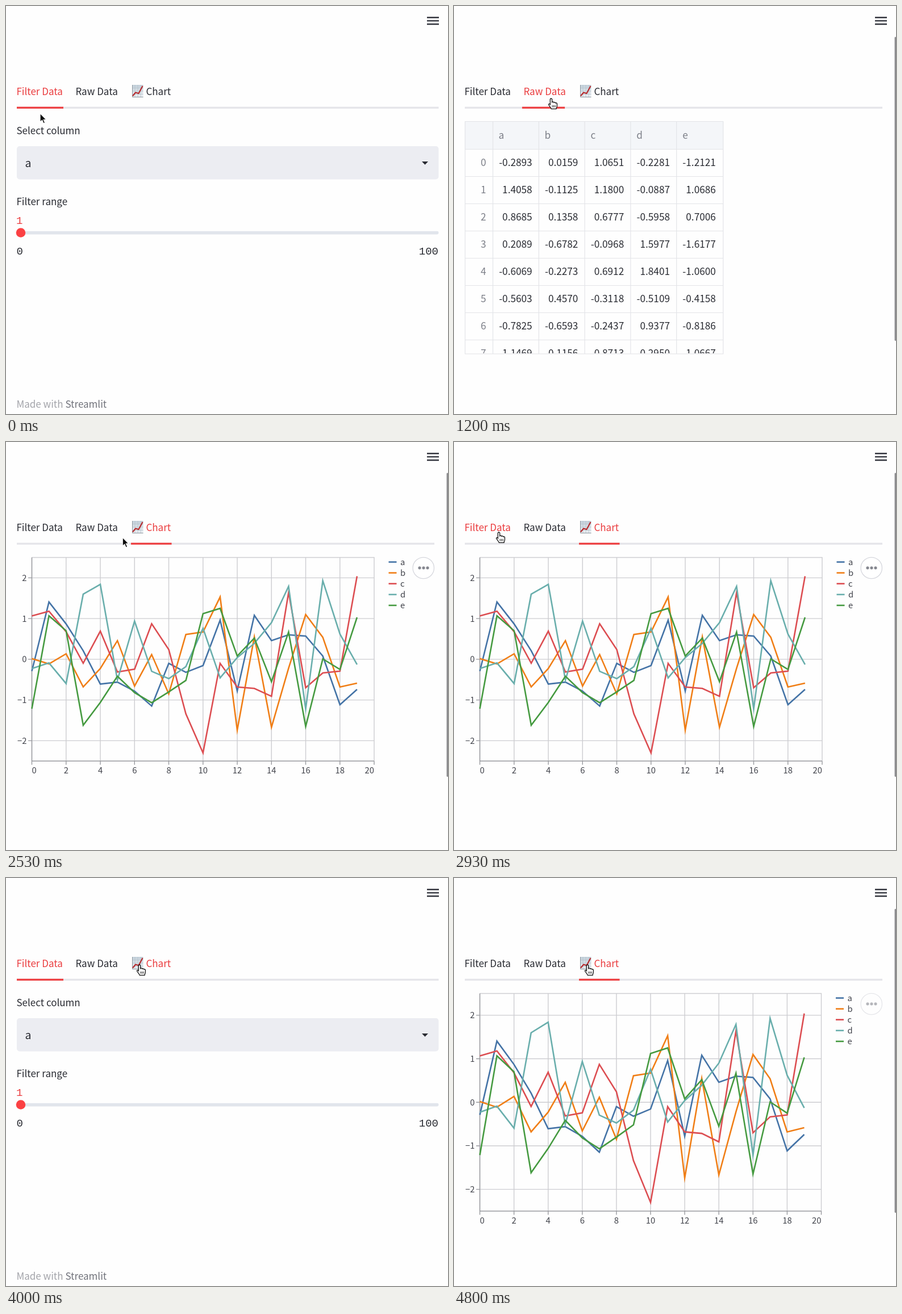
Recreate the animation shown at these times as an HTML page. Size 778 px wide and 719 px high, loop 4.87 s.

```html
<!DOCTYPE html>
<html lang="en">
<head>
<meta charset="utf-8">
<title>Tabs demo</title>
<style>
  html, body { margin: 0; width: 100%; height: 100%; overflow: hidden; background: #fefefe; }
  svg { display: block; width: 100vw; height: 100vh; }
  text { font-family: "Noto Sans CJK JP", "Noto Sans CJK SC", "Noto Sans CJK", "Noto Sans", sans-serif; font-size: 17px; fill: #282a31; white-space: pre; }
  .mono { font-family: "Liberation Mono", "DejaVu Sans Mono", monospace; font-size: 19px; }
  .cell { font-size: 17.2px; }
  .dim { fill: #7b7e87; }
  .axis { font-size: 14.8px; fill: #41434b; }
</style>
</head>
<body>
<svg id="stage" viewBox="0 0 778 719" xmlns="http://www.w3.org/2000/svg"></svg>
<script>
const LOOP = 4870;
const INK = '#282a31', RED = '#ea3c3e';
const stage = document.getElementById('stage');

function add(parent, tag, attrs = {}, content) {
  const node = document.createElementNS('http://www.w3.org/2000/svg', tag);
  for (const key in attrs) node.setAttribute(key, attrs[key]);
  if (content !== undefined) node.textContent = content;
  parent.appendChild(node);
  return node;
}
const group = (parent = stage, attrs) => add(parent, 'g', attrs);
const rect = (parent, x, y, width, height, fill, rx = 0) =>
  add(parent, 'rect', { x, y, width, height, fill, rx });
const path = (parent, d, stroke, width, fill = 'none') =>
  add(parent, 'path', { d, stroke, fill, 'stroke-width': width });
const label = (parent, x, y, str, cls = '', anchor = 'start') =>
  add(parent, 'text', { x, y, class: cls, 'text-anchor': anchor }, str);

const names = ['a', 'b', 'c', 'd', 'e'];
const colors = ['#4473a6', '#f07e16', '#dc4d51', '#69aeac', '#459a40'];
const data = [
  [-.2893, 1.4058, .8685, .2089, -.6069, -.5603, -.7825, -1.1469, -.1, -.32, -.155, .96, -.78, 1.08, .46, .6, .57, .08, -1.115, -.74],
  [.0159, -.1125, .1358, -.6782, -.2273, .457, -.6593, .1156, -.85, .61, .67, 1.53, -1.74, .55, -1.67, -.22, 1.1, .54, -.68, -.585],
  [1.0651, 1.18, .6777, -.0968, .6912, -.3118, -.2437, .8713, .24, -1.34, -2.3, -.1, -.68, -.715, -.91, 1.64, -.7, -.335, -.29, 2.04],
  [-.2281, -.0887, -.5958, 1.5977, 1.8401, -.5109, .9377, -.295, -.475, -.18, .76, -.455, .04, .39, .9, 1.79, -1.22, 1.93, .62, -.13],
  [-1.2121, 1.0686, .7006, -1.6177, -1.06, -.4158, -.8186, -1.0667, -.8, -.52, 1.12, 1.25, .08, .52, -.55, .67, -1.65, .01, -.25, 1.03]
];

function buildForm() {
  const g = group();
  label(g, 18.4, 225.5, 'Select column');
  rect(g, 19, 247, 742.5, 58.5, '#ecedf2', 5);
  label(g, 33.5, 283.5, 'a').style.fontSize = '19.5px';
  path(g, 'M732 274h11l-5.5 5.8z', 'none', 0, INK);
  label(g, 18.4, 350.5, 'Filter range');
  label(g, 18, 383.5, '1', 'mono').style.fill = RED;
  rect(g, 19, 396.8, 742.5, 5.6, '#e1e5ec', 2.8);
  add(g, 'circle', { cx: 26, cy: 399.5, r: 8.3, fill: '#fb4143' });
  label(g, 18.5, 437.5, '0', 'mono');
  label(g, 761, 437.5, '100', 'mono', 'end');
  const foot = label(g, 18.4, 707.5, 'Made with ');
  foot.style.fill = '#a2a3a9';
  add(foot, 'tspan', { fill: '#70727a' }, 'Streamlit');
  return g;
}

function buildTable() {
  const g = group();
  const clip = add(add(g, 'defs'), 'clipPath', { id: 'tableClip' });
  rect(clip, 19, 203, 456, 409, '#000');
  rect(g, 19, 203.5, 455, 49, '#f4f6f9');
  let lines = 'M19.5 203.5H473.8V613H19.5Z';
  for (let i = 0; i < 5; i++) lines += `M${68.5 + 80.8 * i} 203.5V613`;
  for (let i = 0; i < 8; i++) lines += `M19 ${252.5 + 48 * i}H474`;
  path(g, lines, '#e3e4e8', 1.2);
  const cells = group(g, { 'clip-path': 'url(#tableClip)' });
  names.forEach((n, c) => label(cells, 78.6 + 80.9 * c, 234, n, 'cell dim'));
  for (let r = 0; r < 8; r++) {
    const y = 282 + 48 * r;
    label(cells, 56.6, y, r, 'cell dim', 'end');
    data.forEach((col, c) => label(cells, 137.6 + 80.8 * c, y, col[r].toFixed(4), 'cell', 'end'));
  }
  return g;
}

function buildChart(right, bottom, legendX, menuAlpha) {
  const g = group(), left = 45.5, top = 203.5;
  const px = v => left + (right - left) * v / 20;
  const py = v => (top + bottom) / 2 - (bottom - top) * v / 5;
  let grid = `M${left} ${top}H${right}V${bottom}`;
  let axes = `M${left} ${top}V${bottom}H${right}`;
  for (let v = 0; v <= 20; v += 2) {
    grid += `M${px(v)} ${top}V${bottom}`;
    axes += `M${px(v)} ${bottom}v6.5`;
    const anchor = v === 0 ? 'start' : v === 20 ? 'end' : 'middle';
    label(g, px(v), bottom + 21.5, v, 'axis', anchor);
  }
  for (let v = -2; v <= 2; v++) {
    grid += `M${left} ${py(v)}H${right}`;
    axes += `M${left} ${py(v)}h-6.5`;
    label(g, 36.5, py(v) + 5.5, String(v).replace('-', '\u2212'), 'axis', 'end');
  }
  path(g, grid, '#cdcdd1', 1.4);
  path(g, axes, '#98999e', 1.4);
  data.forEach((col, i) => {
    const pts = col.map((v, k) => `${px(k).toFixed(1)},${py(v).toFixed(1)}`).join(' ');
    add(g, 'polyline', { points: pts, fill: 'none', stroke: colors[i], 'stroke-width': 2.6, 'stroke-miterlimit': 10 });
    const y = 211.5 + 19.1 * i;
    path(g, `M${legendX} ${y}h14`, colors[i], 2.6);
    label(g, legendX + 20.5, y + 5, names[i], 'axis');
  });
  const menu = group(g, { opacity: menuAlpha });
  add(menu, 'circle', { cx: 734.8, cy: 222, r: 18.7, fill: '#fff', stroke: '#d6d7dd', 'stroke-width': 1.3 });
  for (const dx of [-7, 0, 7]) add(menu, 'circle', { cx: 735 + dx, cy: 221.8, r: 2.6, fill: '#85878f' });
  return g;
}

function buildIcon() {
  const g = group();
  const grad = add(add(g, 'defs'), 'linearGradient', { id: 'sheet', x1: 0, y1: 0, x2: 0, y2: 1 });
  add(grad, 'stop', { offset: 0, 'stop-color': '#c3d0da' });
  add(grad, 'stop', { offset: 1, 'stop-color': '#eef1f4' });
  rect(g, 222, 139, 19.5, 21.8, 'url(#sheet)');
  path(g, 'M227 139v22M232 139v22M237 139v22M222 144.5h19.5M222 150h19.5M222 155.5h19.5', '#b4c0ca', .7);
  path(g, 'M222.5 139V160.5H241.5', '#8d979f', 1);
  path(g, 'M223 158.5L228 152.5L233.5 154L240.5 141', '#b5292c', 2.1);
}

// Page furniture
path(stage, 'M741 20.2h21M741 26.1h21M741 32h21', '#33353e', 2.4);
const border = rect(stage, 19, 177.6, 742.5, 3.2, '#e4e4e9');
const bar = rect(stage, 19, 177.6, 82, 3.2, '#ee3b3d');
const scroll = rect(stage, 775.6, 54.5, 3, 535.5, '#8b8b8e', 1.4);
const tabs = [
  { x: 19, w: 82, hit: [19, 101], node: label(stage, 18.4, 156.5, 'Filter Data') },
  { x: 123, w: 75, hit: [123, 198], node: label(stage, 122.4, 156.5, 'Raw Data') },
  { x: 220, w: 71.5, hit: [222, 291], node: label(stage, 246.4, 156.5, 'Chart') }
];
buildIcon();

const views = [buildForm(), buildTable(), buildChart(648, 562.3, 673.5, 1), buildChart(646.5, 587, 672, .6)];

// Each switch: when, which tab, which view
const switches = [
  { t: -1000, tab: 0, view: 0 },
  { t: 895, tab: 1, view: 1 },
  { t: 1850, tab: 2, view: 2 },
  { t: 2990, tab: 0, view: 0 },
  { t: 4065, tab: 2, view: 3 }
];

// Pointer moves: start, end, target, sideways sag
const start = [60, 189];
const moves = [
  { a: 300, b: 800, to: [171, 163], sag: 0 },
  { a: 1350, b: 1780, to: [269, 160], sag: 5 },
  { a: 2355, b: 2805, to: [79, 159], sag: 9.5 },
  { a: 3470, b: 3930, to: [235, 153], sag: 4 }
];

const arrow = path(stage, 'M0 0V15.6L3.6 12.3L6 18L8.7 16.9L6.3 11.3H11Z', '#fff', 1.3, '#0b0b0b');
const hand = group();
path(hand, 'M-1.7 1.7C-1.7-.6 1.6-.6 1.6 1.7V6.4C2.2 5.5 4.5 5.7 4.8 7.1C5.4 6.3 7.5 6.5 7.8 8C8.6 7.4 10.4 7.8 10.4 9.5V13C10.4 15 9.1 16 9 18.4H.3C-.2 16.4-3 13.6-4.2 11.5C-5.3 9.6-3.2 8.4-1.7 10.5Z', '#111', 1.3, '#fff');
path(hand, 'M2.1 11.8v3.8M4.6 11.8v3.8M7.1 11.8v3.8', '#111', 1);

const clamp = v => Math.max(0, Math.min(1, v));
const mix = (a, b, p) => a + (b - a) * p;
const smooth = p => p * p * (3 - 2 * p);

// cubic-bezier(.86, 0, .07, 1)
function glide(x) {
  if (x <= 0 || x >= 1) return clamp(x);
  let lo = 0, hi = 1, s = .5;
  for (let i = 0; i < 24; i++) {
    s = (lo + hi) / 2;
    const bx = 3 * s * (1 - s) * (1 - s) * .86 + 3 * s * s * (1 - s) * .07 + s * s * s;
    if (bx < x) lo = s; else hi = s;
  }
  return smooth(s);
}

function pointer(t) {
  let [x, y] = start;
  for (const m of moves) {
    const p = smooth(clamp((t - m.a) / (m.b - m.a)));
    x = mix(x, m.to[0], p);
    y = mix(y, m.to[1], p) + m.sag * Math.sin(Math.PI * p);
  }
  return [x, y];
}

function draw(t) {
  const n = switches.filter(s => s.t <= t).length - 1;
  const now = switches[n], from = tabs[switches[Math.max(0, n - 1)].tab], to = tabs[now.tab];
  views.forEach((v, i) => v.setAttribute('display', i === now.view ? 'inline' : 'none'));
  scroll.setAttribute('display', now.view ? 'inline' : 'none');
  border.setAttribute('width', now.view ? 735 : 742.5);

  const p = glide((t - now.t) / 400);
  bar.setAttribute('x', mix(from.x, to.x, p));
  bar.setAttribute('width', mix(from.w, to.w, p));

  const [x, y] = pointer(t);
  let over = false;
  for (const tab of tabs) {
    const hit = y < 180 && x >= tab.hit[0] && x <= tab.hit[1];
    over = over || hit;
    tab.node.style.fill = hit || tab === to ? RED : INK;
  }
  const place = `translate(${x.toFixed(2)} ${y.toFixed(2)})`;
  arrow.setAttribute('transform', place);
  hand.setAttribute('transform', place);
  arrow.setAttribute('display', over ? 'none' : 'inline');
  hand.setAttribute('display', over ? 'inline' : 'none');
}

let origin;
function tick(time) {
  if (origin === undefined) origin = time;
  draw((time - origin) % LOOP);
  requestAnimationFrame(tick);
}
draw(0);
requestAnimationFrame(tick);
</script>
</body>
</html>
```
